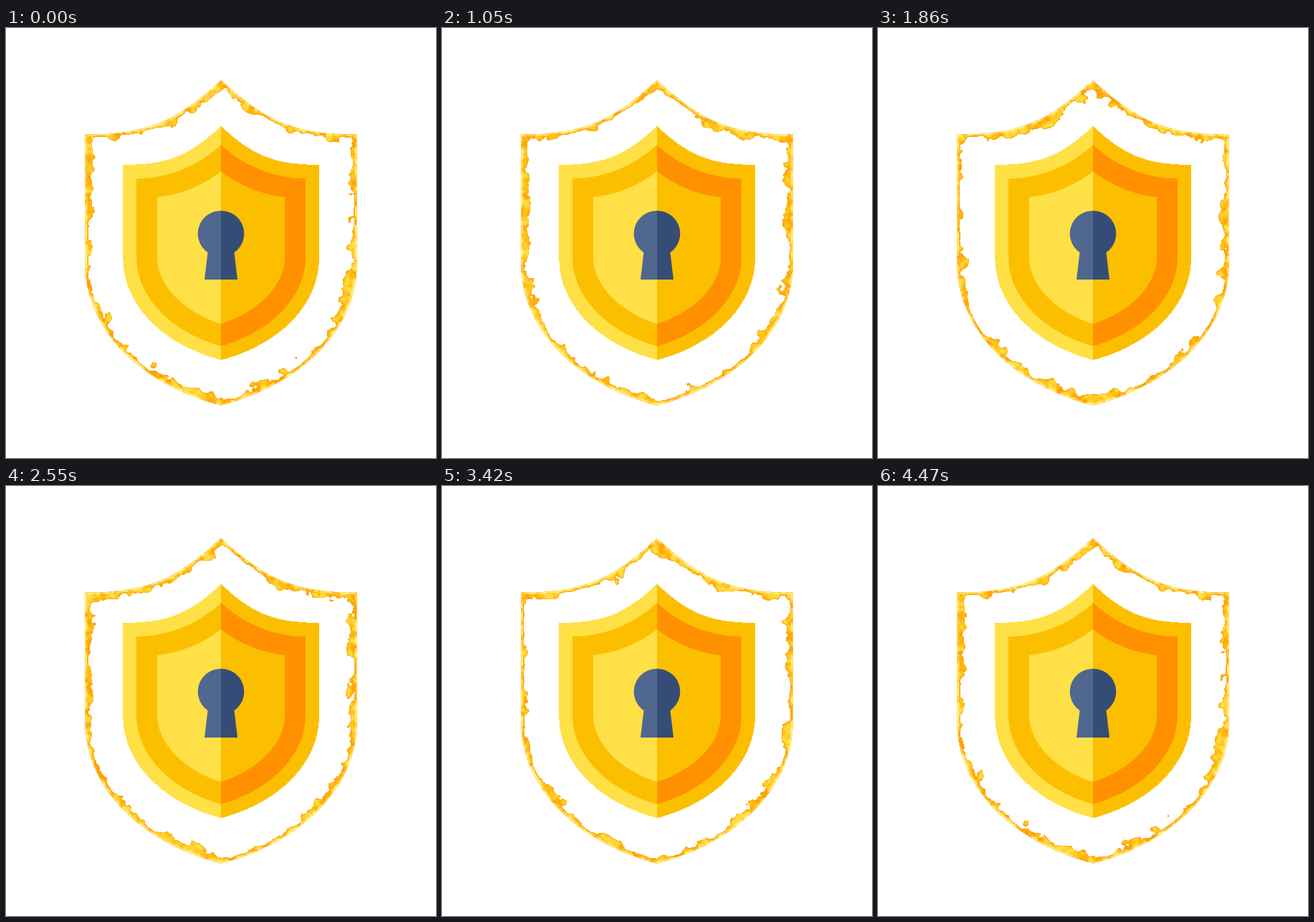
Write an HTML page with a canvas that moves like this. It is 600 by 600 pixels and loops after 4500 ms.

```html
<!DOCTYPE html>
<html lang="en">
<head>
<meta charset="utf-8">
<title>Burning shield</title>
<style>
  html, body { margin: 0; width: 600px; height: 600px; overflow: hidden; background: #fff; }
  canvas, svg { position: absolute; left: 0; top: 0; }
  .plate { fill: var(--plate); }
  .rim { shape-rendering: crispEdges; }
  .ring { fill: var(--ring); }
  .key { fill: var(--key); }
</style>
</head>
<body>
<canvas width="600" height="600"></canvas>
<svg width="600" height="600" viewBox="0 0 600 600">
  <defs>
    <g id="half">
      <path class="plate rim" d="M300 137C257 177 228 191 163 191V320C163 385 216 441 300 463.500Z"/>
      <path class="ring" d="M300 163C270 191 228 210 182 210V320C182 372 226 423 300 444Z"/>
      <path class="plate" d="M300 200C274 220 243 233 211 236V320C211 357 245 395 300 413Z"/>
      <path class="key" d="M300 255A32 32 0 0 0 281.500 313.300L277 351H300Z"/>
    </g>
  </defs>
  <use href="#half" style="--plate:#ffe047;--ring:#fcbf00;--key:#50678f"/>
  <use href="#half" transform="matrix(-1 0 0 1 600 0)" style="--plate:#fcbf00;--ring:#ff9100;--key:#354d76"/>
</svg>
<script>
const LOOP = 4500, STEP = 30, Z_CELLS = 12, SPREAD = 10, REACH = 26;
const ctx = document.querySelector('canvas').getContext('2d');
const image = ctx.createImageData(600, 600);

const outline = 'M300 72.5C240 128 200 148.5 110 148.5V328' +
  'C110 418 183.5 496 300 527C416.5 496 490 418 490 328V148.5C400 148.5 360 128 300 72.5Z';

// Soft depth thickens the corners; edge is the true distance to the outline.
function buildBand() {
  const path = document.createElementNS('http://www.w3.org/2000/svg', 'path');
  path.setAttribute('d', outline);
  const shape = new Path2D(outline);
  const glow = new Float32Array(360000), edge = new Float32Array(360000).fill(99);
  for (let s = 0, len = path.getTotalLength(); s < len; s++) {
    const p = path.getPointAtLength(s), px = Math.floor(p.x), py = Math.floor(p.y);
    for (let y = py - REACH; y <= py + REACH; y++) {
      for (let x = px - REACH; x <= px + REACH; x++) {
        const r2 = (x + .5 - p.x) ** 2 + (y + .5 - p.y) ** 2, i = y * 600 + x;
        glow[i] += Math.exp(-r2 / SPREAD ** 2) / (SPREAD * Math.sqrt(Math.PI));
        edge[i] = Math.min(edge[i], Math.sqrt(r2));
      }
    }
  }
  const band = [];
  for (let i = 0; i < glow.length; i++) {
    const x = i % 600, y = Math.floor(i / 600);
    if (edge[i] > REACH || !ctx.isPointInPath(shape, x + .5, y + .5)) continue;
    const depth = SPREAD * Math.sqrt(-Math.log(Math.min(1, glow[i])));
    if (depth < 21) band.push({ i: i * 4, x, y, depth, edge: edge[i] });
  }
  return band;
}

let seed = 41;
const random = () => (seed = (Math.imul(seed, 1664525) + 1013904223) >>> 0) / 2 ** 32;
const lattice = Float32Array.from({ length: 4096 }, () => random() * 2 - 1);
const at = (x, y, z) => {
  const h = Math.imul(x, 374761393) + Math.imul(y, 668265263) + Math.imul(z, 1274126177);
  return lattice[(Math.imul(h ^ (h >>> 13), 1103515245) >>> 16) & 4095];
};
const mix = (a, b, t) => a + (b - a) * t;
const ease = t => t * t * (3 - 2 * t);
const clamp = v => Math.max(0, Math.min(1, v));

function noise(x, y, z) {
  const X = Math.floor(x), Y = Math.floor(y), Z = Math.floor(z);
  const u = ease(x - X), v = ease(y - Y);
  const slice = k => mix(
    mix(at(X, Y, k), at(X + 1, Y, k), u),
    mix(at(X, Y + 1, k), at(X + 1, Y + 1, k), u), v);
  return mix(slice(Z % Z_CELLS), slice((Z + 1) % Z_CELLS), ease(z - Z));
}

const PALE = [255, 243, 160], EMBER = [252, 164, 8], GOLD = [255, 192, 20], LIGHT = [255, 222, 66];
const blend = (a, b, t) => a.map((c, k) => mix(c, b[k], t));

function fireColor(edge, body, tone) {
  const core = blend(GOLD, tone > 0 ? LIGHT : EMBER, clamp(Math.abs(tone) * 1.7));
  const fire = blend(EMBER, core, clamp(body / 2.5));
  const sheen = edge < 1 ? .35 : clamp((3.6 - edge) / 2) * clamp(.65 + tone);
  return blend(fire, PALE, sheen);
}

const band = buildBand();
let shown = -1;

function draw() {
  const frame = Math.floor(performance.now() % LOOP / STEP);
  if (frame !== shown) {
    shown = frame;
    const z = frame * STEP / LOOP * Z_CELLS;
    image.data.fill(0);
    for (const { i, x, y, depth, edge } of band) {
      const coarse = noise(x / 19, y / 19, z);
      const medium = noise(x / 9 + 90, y / 9, z);
      const fine = noise(x / 4, y / 4 + 70, z);
      const body = Math.max(7.5 + 7.5 * coarse + 5.5 * medium + 2.5 * fine - depth, 4.6 + medium - edge);
      if (body <= 0) continue;
      const [r, g, b] = fireColor(edge, body, .7 * medium - .5 * fine);
      image.data[i] = r;
      image.data[i + 1] = g;
      image.data[i + 2] = b;
      image.data[i + 3] = 255;
    }
    ctx.putImageData(image, 0, 0);
  }
  requestAnimationFrame(draw);
}
draw();
</script>
</body>
</html>
```
